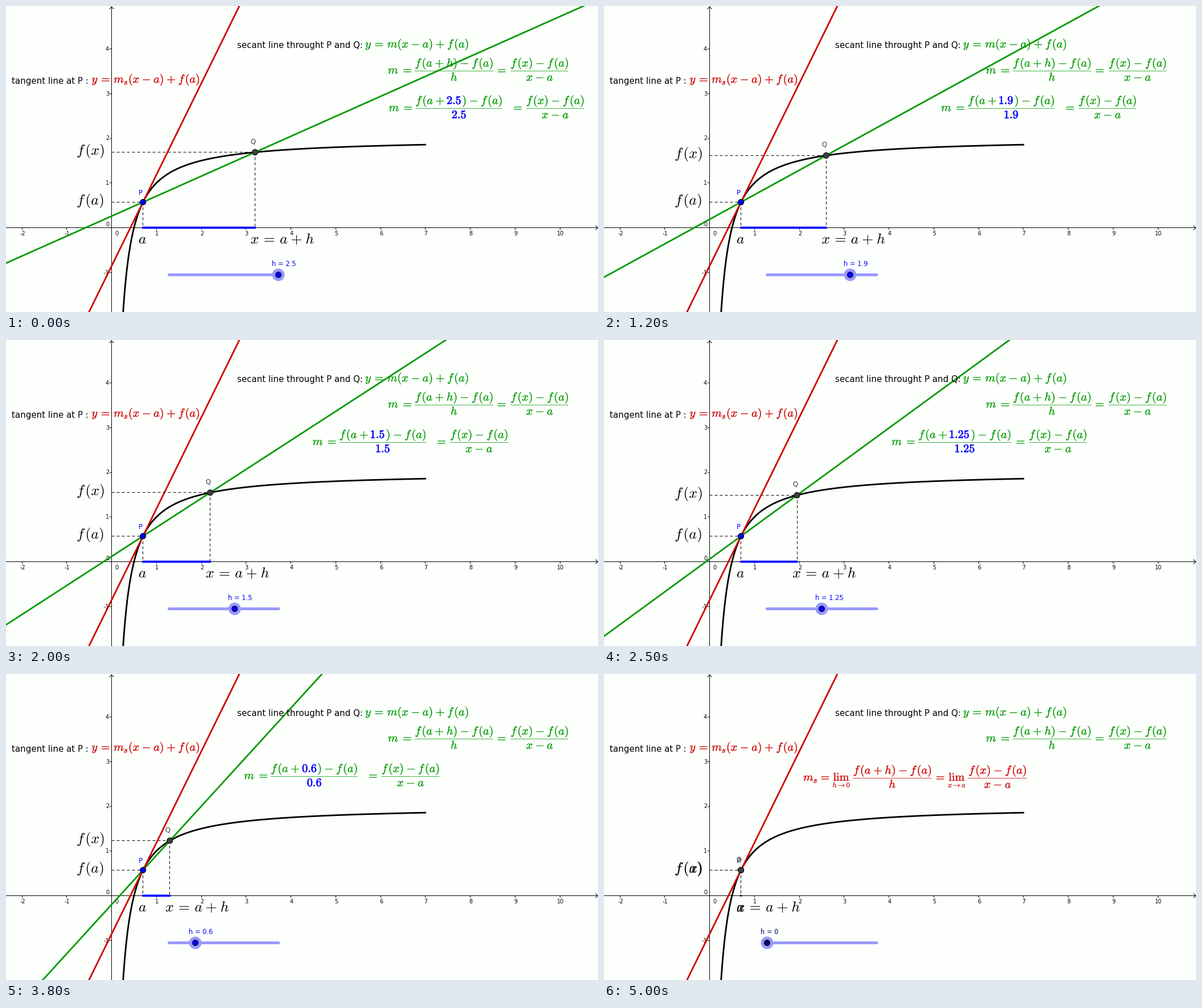
Write a matplotlib script that moves like this. It is 1040x539 px and loops after 6100 ms.

```python
import numpy as np
import matplotlib.pyplot as plt
from matplotlib.animation import FuncAnimation
from matplotlib.patches import Circle, PathPatch
from matplotlib.path import Path
from matplotlib.textpath import TextPath
from matplotlib.transforms import Affine2D

WIDTH, HEIGHT, DPI = 1040, 539, 64
PX = 72 / DPI  # points per pixel
UNIT, OX, OY = 78.75, 185.5, 390.5
GREEN, RED, BLUE, NAVY = "#009900", "#cc0000", "#0000ff", "#000060"
PALE, GRAY, BLACK = "#9999ff", "#404040", "#000000"
A = 0.7
SLIDER_Y = 473.5
STEPS, FRAMES = 50, 61

plt.rcParams["mathtext.fontset"] = "cm"
plt.rcParams["font.family"] = "DejaVu Sans"

fig = plt.figure(figsize=(WIDTH / DPI, HEIGHT / DPI), dpi=DPI, facecolor="#fdfffd")
ax = fig.add_axes([0, 0, 1, 1])
ax.set_xlim(0, WIDTH)
ax.set_ylim(HEIGHT, 0)
ax.axis("off")


def f(x):
    return 2 - 1 / x


def sx(x):
    return OX + UNIT * x


def sy(y):
    return OY - UNIT * y


def crisp(v):
    """Centre of the pixel that holds v."""
    return np.floor(v) + 0.5


def line(xs, ys, color=BLACK, width=1.0, z=1, **kw):
    ax.plot(xs, ys, color=color, lw=width * PX, zorder=z, snap=False, **kw)


def slanted(slope, color, z):
    """Full line through P with the given slope."""
    xs = np.array([-3, 12])
    line(sx(xs), sy(f(A) + slope * (xs - A)), color, 2.8, z)


def label(s, x, y, size, color=BLACK, ha="left", z=6):
    ax.text(x, y, s, fontsize=size * PX, color=color, ha=ha, va="baseline", zorder=z)


def disc(x, y, r, color, z, edge=True):
    ax.add_patch(Circle((x, y), r, fc=color, ec=BLACK, lw=PX if edge else 0, zorder=z))


def tex(s):
    """Add the usual spacing around operators and after the slanted f."""
    s = s.replace("f(", r"f\hspace{0.12}(")
    for op, gap in (("=", 0.17), ("+", 0.06), ("-", 0.06)):
        space = r"\hspace{%s}" % gap
        s = s.replace(op, space + op + space)
    return f"${s}$"


def math(s, x, y, color=BLACK, size=20.2, weight=0.4, align=0.0):
    """Formula whose ink starts (0), centres (0.5) or ends (1) at x."""
    path = TextPath((0, 0), tex(s), size=size)
    ink = path.vertices[path.codes != Path.CLOSEPOLY][:, 0]
    left = x - ink.min() - align * np.ptp(ink)
    place = Affine2D().scale(1, -1).translate(left, y)
    ax.add_patch(PathPatch(path.transformed(place), fc=color, ec=color,
                           lw=weight * PX, joinstyle="round", zorder=6))


def big(s, x, y):
    math(s, x, y, size=25.7, weight=0)


def bar(x0, x1, y, color):
    line([x0, x1], [y, y], color, 0.75, 6, solid_capstyle="butt")


def fraction(x0, x1, y, num, den, color):
    mid = (x0 + x1) / 2
    math(num, mid, y - 7.9, color, align=0.5)
    math(den, mid, y + 17.2, color, align=0.5)
    bar(x0, x1, y, color)


def equals(x, y, color):
    math("=", x, y + 4.6, color, align=0.5)


def draw_axes():
    line([0, WIDTH], [OY, OY])
    line([OX, OX], [1, HEIGHT])
    line([1036, 1039.5, 1036], [OY - 3.5, OY, OY + 3.5])
    line([OX - 3.5, OX, OX + 3.5], [5, 1.5, 5])
    for n in range(-2, 11):
        line([crisp(sx(n))] * 2, [OY, OY + 3.5], solid_capstyle="butt")
        shift = 8.5 if n == 0 else 1
        label(str(n), sx(n) + shift, 403.5, 9.6, ha="center", z=1)
    for n in range(-1, 5):
        line([OX - 3.5, OX], [crisp(sy(n))] * 2, solid_capstyle="butt")
        shift = -2 if n == 0 else 3.5
        label(str(n), 181, sy(n) + shift, 9.6, ha="right", z=1)


def draw_fixed():
    draw_axes()
    xs = np.linspace(0.2, 7, 600)
    line(sx(xs), sy(f(xs)), BLACK, 2.8, 2)
    slanted(1 / A**2, RED, 4)
    label("tangent line at P :", 10, 136.5, 15)
    math("y=m_s(x-a)+f(a)", 151, 135, RED)
    label("secant line throught P and Q:", 406, 74, 15)
    math("y=m(x-a)+f(a)", 631.5, 73, GREEN)
    y = 114.5
    math("m", 671.5, y + 4.6, GREEN)
    equals(705, y, GREEN)
    fraction(718, 856, y, "f(a+h)-f(a)", "h", GREEN)
    equals(870.7, y, GREEN)
    fraction(886.5, 988, y, "f(x)-f(a)", "x-a", GREEN)
    big("f(a)", 125.5, sy(f(A)) + 4.3)
    big("a", 234, 418.5)
    line([286.5, 479], [SLIDER_Y] * 2, PALE, 5, 3, solid_capstyle="round")


def dashes(x, y):
    x, y = crisp(x), crisp(y)
    for xs, ys in (([OX, x], [y, y]), ([x, x], [y, OY])):
        line(xs, ys, BLACK, 1, 2, dashes=(5, 4), dash_capstyle="butt")


def slope_formula(h):
    """Difference quotient with the current h, sliding along with it."""
    y, x = 180.5, 338.5 + 133.8 * h
    value = f"{h:g}"
    digits = len(value.replace(".", ""))
    x0 = x + 46.5
    x1 = x0 + 125.7 + 10.5 * digits + 5.8 * ("." in value)
    number = r"\mathrm{%s}" % value
    math("m", x, y + 4.6, GREEN)
    equals(x + 33.3, y, GREEN)
    math("f(a+", x0 + 1, y - 7.9, GREEN)
    math(number, x0 + 55.5, y - 7.9, BLUE, weight=0.7)
    math(")-f(a)", x1 - 1.5, y - 7.9, GREEN, align=1)
    math(number, (x0 + x1) / 2, y + 17.2, BLUE, weight=0.7, align=0.5)
    bar(x0, x1, y, GREEN)
    equals(x + 226, y, GREEN)
    fraction(x + 241, x + 342.5, y, "f(x)-f(a)", "x-a", GREEN)


def limit_formula():
    y = 183.5
    math("m_s", 350.5, y + 4.6, RED)
    equals(388.5, y, RED)
    fraction(437, 576, y, "f(a+h)-f(a)", "h", RED)
    equals(590.7, y, RED)
    fraction(639.5, 743, y, "f(x)-f(a)", "x-a", RED)
    for x, under in ((416.7, r"h\rightarrow 0"), (619.5, r"x\rightarrow a")):
        math(r"\mathrm{lim}", x, y + 4.6, RED, align=0.5)
        math(under, x, y + 16, RED, size=12.5, weight=0.25, align=0.5)


def draw(frame):
    for artist in list(ax.get_children()):
        if artist not in fixed:
            artist.remove()

    h = round(2.5 - 0.05 * min(frame, STEPS), 2)
    px, py = sx(A), sy(f(A))
    qx, qy = sx(A + h), sy(f(A + h))
    blue = BLUE if h else NAVY

    dashes(px, py)
    dashes(qx, qy)
    if h:
        slanted((f(A + h) - f(A)) / h, GREEN, 3)
        slope_formula(h)
        line([px, qx], [OY, OY], BLUE, 3.8, 4, solid_capstyle="round")
    else:
        limit_formula()
        disc(px, OY, 1.7, NAVY, 4, edge=False)

    disc(px, py, 5, BLUE, 7)
    disc(qx, qy, 5, GRAY, 8)
    label("P", px - 7.3, py - 12.3, 11.5, blue)
    label("Q", qx - 8, qy - 15.5, 11.5, GRAY)
    big("f(x)", 125.5, qy + 4.3)
    big("x=a+h", qx - 7, 418.5)

    knob = 286.5 + 76.8 * h
    disc(knob, SLIDER_Y, 11, PALE, 4, edge=False)
    disc(knob, SLIDER_Y, 5, blue, 5)
    label(f"h = {h:g}", knob - 11.5, 458.3, 11.5, blue)
    return []


draw_fixed()
fixed = set(ax.get_children())
animation = FuncAnimation(fig, draw, frames=FRAMES, interval=100,
                          repeat=True, repeat_delay=0, blit=False)
plt.show()
```
